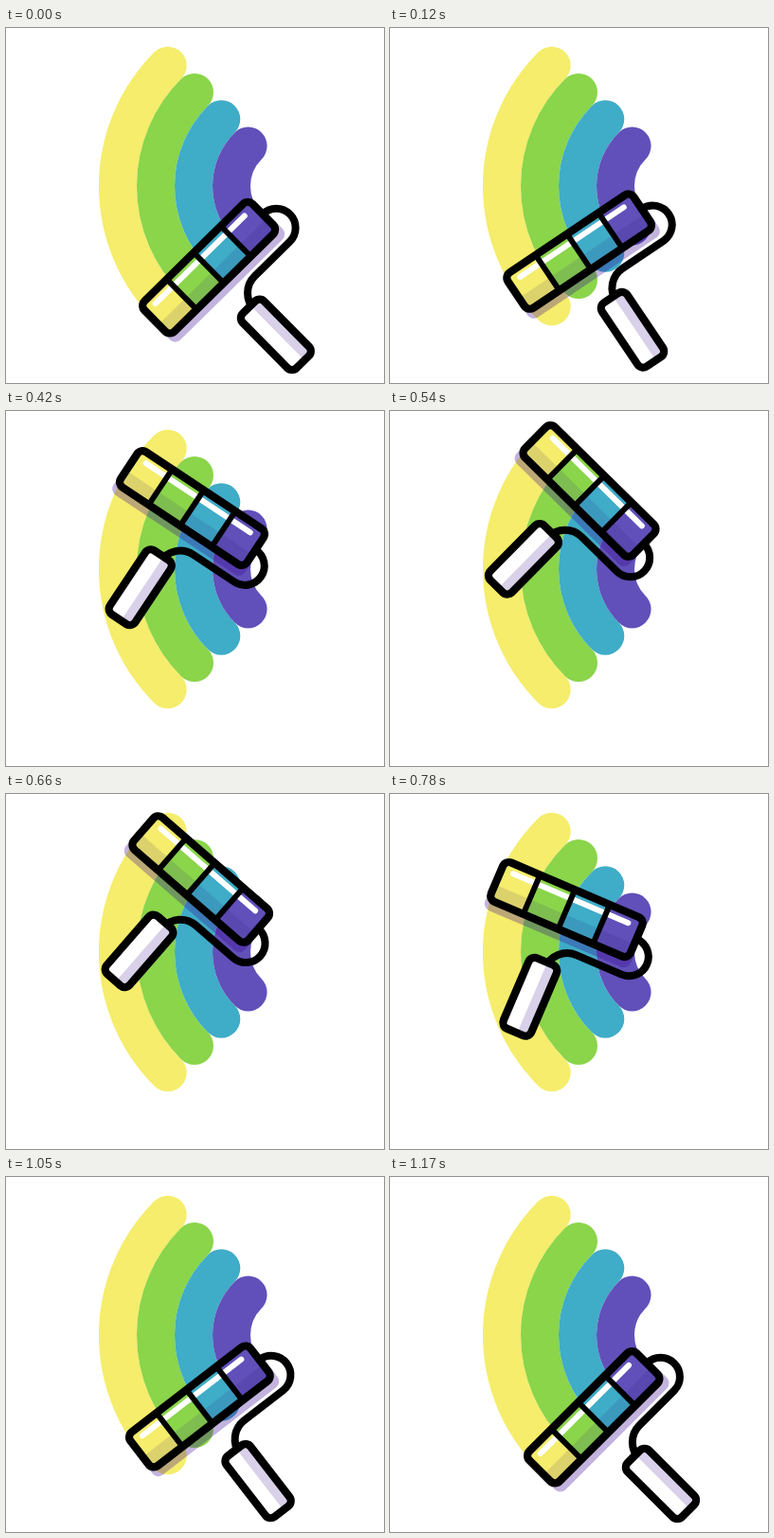
An HTML page that plays this animation: 399 px wide and 375 px high, repeating every 1200 ms.

```html
<!DOCTYPE html>
<html lang="en">
<head>
<meta charset="utf-8">
<title>Rainbow paint roller</title>
<style>
  html, body { margin: 0; width: 100%; height: 100%; overflow: hidden; background: #fff; }
  svg { display: block; width: 100%; height: 100%; }
  .ink { fill: none; stroke: #000; stroke-width: 8.3; }
</style>
</head>
<body>
<svg viewBox="0 0 399 375">
  <!-- Origin is the shared centre of the stripes and the roller's pivot -->
  <g transform="translate(298 167)">
    <g id="stripes" fill="none" stroke-width="40" stroke-linecap="round"></g>
    <g id="tool">
      <rect x="-203" y="-10" width="167" height="45.8" rx="8" fill="#370591" opacity=".3"/>
      <path class="ink" style="stroke-width:8" d="M-40 2A20.4 20.4 0 0 1-40 42.8H-92A25 25 0 0 0-117 67.8"/>
      <rect x="-135.5" y="62" width="32" height="81" rx="7" fill="#fff"/>
      <path d="M-117 62h11v81h-11z" fill="#d9d0e9"/>
      <rect class="ink" x="-135.5" y="62" width="32" height="81" rx="7"/>
      <g id="segments"></g>
      <path d="M-198 8h156v16h-156z" fill="#2a1070" opacity=".12"/>
      <path d="M-187-10H-55" stroke="#fff" stroke-width="6" stroke-linecap="round"/>
      <path class="ink" style="stroke-width:6" d="M-160.4-20v45M-120.4-20v45M-80.4-20v45"/>
      <rect class="ink" x="-200.2" y="-20" width="160" height="45" rx="7"/>
    </g>
  </g>
</svg>
<script>
const PERIOD = 1200, LEAD = 28, SWING = 90, REST = -45;
const colors = ['#f5ed6b', '#8ad54a', '#3facc8', '#6150b9'];
const byId = id => document.getElementById(id);

function add(parent, name, attrs) {
  const el = document.createElementNS('http://www.w3.org/2000/svg', name);
  for (const key in attrs) el.setAttribute(key, attrs[key]);
  byId(parent).append(el);
}

colors.forEach((color, i) => {
  const r = 180 - 40 * i, d = r * Math.SQRT1_2;
  add('stripes', 'path', { d: `M${-d} ${-d}A${r} ${r} 0 0 0 ${-d} ${d}`, stroke: color });
  add('segments', 'rect', { x: -200.4 + 40 * i, y: -20, width: 40, height: 45, rx: i % 3 ? 0 : 6, fill: color });
});

const easeInOutQuad = p => p < .5 ? 2 * p * p : 1 - 2 * (1 - p) ** 2;

const start = performance.now();
function draw() {
  const phase = (performance.now() - start + LEAD) % PERIOD / PERIOD;
  const there = 1 - Math.abs(1 - 2 * phase);
  byId('tool').setAttribute('transform', `rotate(${REST + SWING * easeInOutQuad(there)})`);
  requestAnimationFrame(draw);
}
draw();
</script>
</body>
</html>
```
